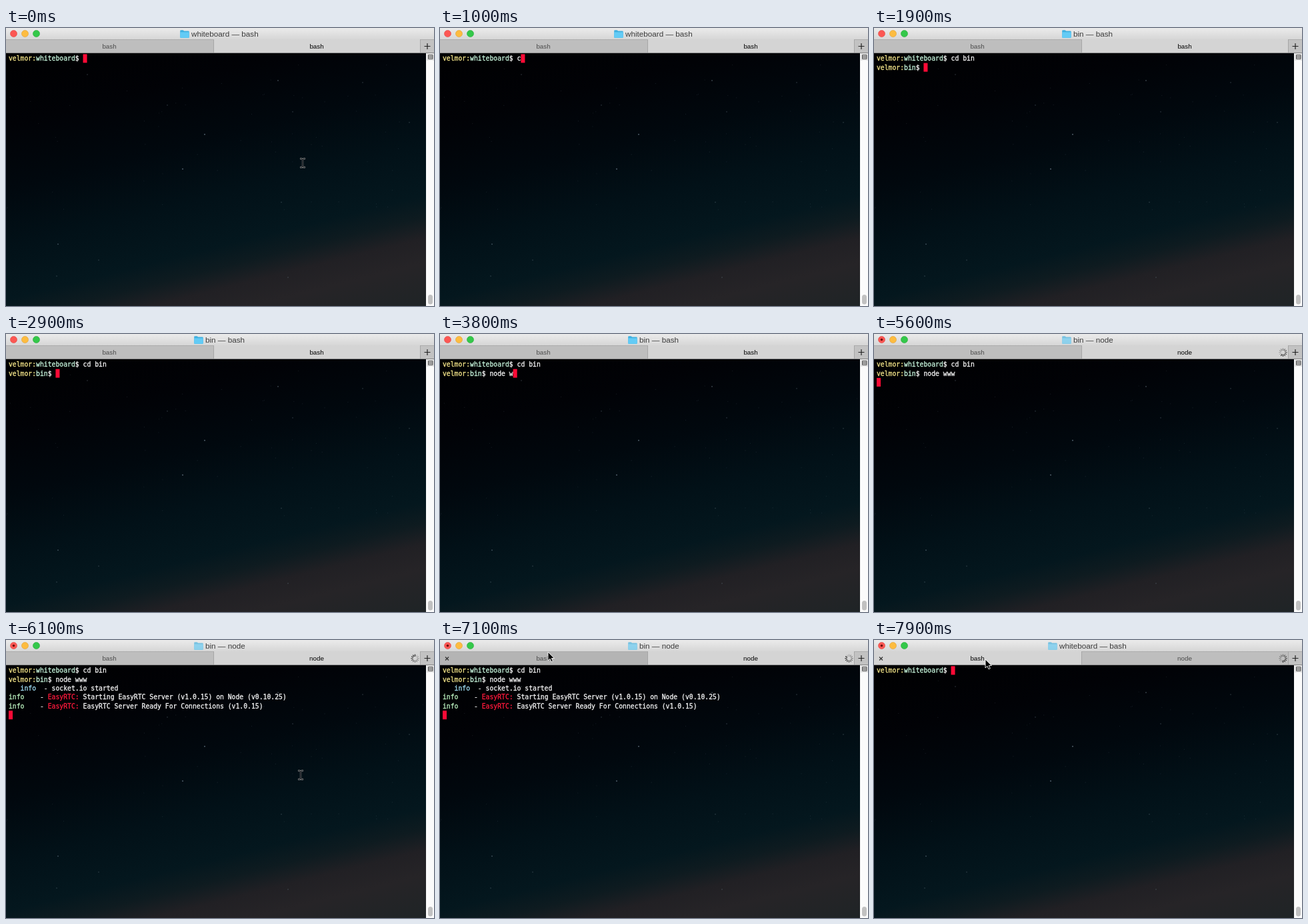
An HTML page that plays this animation: 642 by 418 pixels, repeating every 8 s.

```html
<!DOCTYPE html>
<html lang="en">
<head>
<meta charset="utf-8">
<title>Terminal</title>
<style>
  html, body { margin: 0; width: 100%; height: 100%; overflow: hidden; background: #000; }
  svg { display: block; width: 642px; height: 418px; }
  .ui { font-family: "Liberation Sans", Arial, sans-serif; }
  .tab { font-size: 9.8px; text-anchor: middle; }
  #screen text {
    font: 9.75px "DejaVu Sans Mono", monospace;
    white-space: pre; stroke-width: .3px;
  }
</style>
</head>
<body>
<svg viewBox="0 0 642 418" xmlns="http://www.w3.org/2000/svg">
  <defs>
    <linearGradient id="sky" gradientUnits="userSpaceOnUse" x1="0" y1="38" x2="126" y2="543">
      <stop offset="0" stop-color="#000001"/>
      <stop offset=".2" stop-color="#010206"/>
      <stop offset=".38" stop-color="#01080e"/>
      <stop offset=".55" stop-color="#021118"/>
      <stop offset=".69" stop-color="#04171e"/>
      <stop offset=".75" stop-color="#0e1b20"/>
      <stop offset=".81" stop-color="#212024"/>
      <stop offset=".88" stop-color="#262427"/>
      <stop offset="1" stop-color="#1f2426"/>
    </linearGradient>
    <linearGradient id="bar" x2="0" y2="1">
      <stop stop-color="#ebebeb"/><stop offset="1" stop-color="#d5d5d5"/>
    </linearGradient>
  </defs>

  <rect y="38" width="630" height="380" fill="url(#sky)"/>
  <g id="stars" fill="#8fa3b3"></g>
  <g id="screen"></g>
  <rect id="caret" width="6" height="13" fill="#ff0a36"/>

  <rect x="630" y="38" width="12" height="380" fill="#fbfbfb"/>
  <rect x="633" y="401" width="7" height="14.5" rx="3.5" fill="#c1c1c1"/>
  <rect x="631" y="38" width="11" height="11" fill="#e4e4e4"/>
  <path d="M633.5 40.5h6.5v6h-6.5zM634 42.5h6M634 44.5h6" fill="none" stroke="#555"/>

  <rect width="642" height="18" fill="url(#bar)"/>
  <rect y="17" width="642" height="20" fill="#d4d4d4"/>
  <rect id="idle" y="17" height="20" fill="#bebebe"/>
  <rect x="622" y="17" width="20" height="20" fill="#c2c2c2"/>
  <path d="M311.5 17v20M621.5 17v20" stroke="#a6a6a6"/>
  <path id="idleTop" stroke="#acacac"/>
  <path d="M622 17.5h20" stroke="#acacac"/>
  <path d="M0 37.5h642" stroke="#858585"/>
  <path d="M627.5 27.5h9M632 23v9" stroke="#222" stroke-width="1.2"/>

  <circle cx="11.5" cy="8.5" r="5" fill="#fc5753" stroke="#df4744" stroke-width=".6"/>
  <circle cx="28.5" cy="8.5" r="5" fill="#fdbc40" stroke="#de9f34" stroke-width=".6"/>
  <circle cx="45.5" cy="8.5" r="5" fill="#34c84a" stroke="#27aa35" stroke-width=".6"/>
  <circle id="busyDot" cx="11.5" cy="8.5" r="1.8" fill="#6b0f0d"/>

  <g id="folder">
    <path d="M.5 2.2q0-1 1-1h3.6l1.2 1.3h6.7q1 0 1 1v8.300q0 .9-1 .9H1.500q-1 0-1-.9z" fill="#3fb0e0"/>
    <path d="M.5 4.300h13.500v7.500q0 .9-1 .9H1.500q-1 0-1-.9z" fill="#63cbf5"/>
  </g>
  <text id="title" class="ui" y="12.600" font-size="11.7" fill="#3c3c3c"></text>
  <text id="tabL" class="ui tab" x="155" y="31">bash</text>
  <text id="tabR" class="ui tab" x="466" y="31"></text>
  <path id="close" d="M8 25.500l5 5m0-5l-5 5" stroke="#333" stroke-width="1.2"/>
  <g id="spinner" transform="translate(613.5 27.700)" stroke="#222" stroke-width="1.2"></g>

  <g id="beam" fill="none" stroke-linecap="round">
    <path id="beamPath" d="M-3-6.500q3 0 3 2v9q0 2-3 2M3-6.500q-3 0-3 2v9q0 2 3 2" stroke="#858585" stroke-width="2.400"/>
    <path d="M-3-6.500q3 0 3 2v9q0 2-3 2M3-6.500q-3 0-3 2v9q0 2 3 2" stroke="#10151a"/>
  </g>
  <path id="arrow" d="M0 0v13l3-2.700 2 4.500 2.300-1-2-4.300h4z" fill="#000" stroke="#fff" stroke-width=".9"/>
</svg>

<script>
const LOOP = 8000, COL = 5.87, ROW = 13.4;
const ENTER_CD = 1700, ENTER_NODE = 4900, OUTPUT = 5700, SWITCH = 7600;
const WHITE = '#f4f4f4', YELLOW = '#f5e68a', MINT = '#c6f5dc', RED = '#ff1a3c';

const typed = [
  { text: 'cd bin', at: [1000, 1100, 1200, 1300, 1400, 1500] },
  { text: 'node www', at: [3000, 3100, 3200, 3300, 3500, 3800, 4000, 4200] }
];

// time, x, y: the pointer hides while typing
const path = [
  [5800, 445, 203], [6100, 442, 203], [6500, 442, 203],
  [7100, 162, 18], [7500, 167, 29], [8000, 167, 29]
];

const el = id => document.getElementById(id);
const show = (id, on) => el(id).setAttribute('visibility', on ? 'visible' : 'hidden');
const move = (id, x, y) => el(id).setAttribute('transform', `translate(${x} ${y})`);

const prompt = dir => [['velmor:', YELLOW], [dir, MINT], ['$ ', WHITE]];
const typedAt = (cmd, t) => cmd.text.slice(0, cmd.at.filter(a => a <= t).length);
const log = (tag, text) =>
  [['info', tag], ['    - ', WHITE], ['EasyRTC: ', RED], [text, WHITE]];

function linesAt(t) {
  if (t >= SWITCH) return [prompt('whiteboard')];
  const lines = [[...prompt('whiteboard'), [typedAt(typed[0], t), WHITE]]];
  if (t >= ENTER_CD) lines.push([...prompt('bin'), [typedAt(typed[1], t), WHITE]]);
  if (t >= OUTPUT) lines.push(
    [['   info', '#9fdcf2'], ['  - socket.io started', WHITE]],
    log('#b9efbd', 'Starting EasyRTC Server (v1.0.15) on Node (v0.10.25)'),
    log('#b9efbd', 'EasyRTC Server Ready For Connections (v1.0.15)'));
  if (t >= ENTER_NODE) lines.push([]);
  return lines;
}

let drawn = '';
function drawScreen(t) {
  const lines = linesAt(t);
  const html = lines.map((line, i) =>
    `<text x="4" y="${(49.2 + i * ROW).toFixed(1)}">` +
    line.map(([s, c]) => `<tspan fill="${c}" stroke="${c}">${s}</tspan>`).join('') +
    '</text>').join('');
  if (html === drawn) return;
  drawn = html;
  el('screen').innerHTML = html;
  const last = lines.length - 1;
  const cols = lines[last].reduce((n, [s]) => n + s.length, 0);
  el('caret').setAttribute('x', 4 + cols * COL);
  el('caret').setAttribute('y', 39.3 + last * ROW);
}

function drawWindow(t) {
  const running = t >= ENTER_NODE, left = t >= SWITCH;
  const dir = t < ENTER_CD || left ? 'whiteboard' : 'bin';
  const job = running ? 'node' : 'bash';
  const x = dir === 'bin' ? 299 : 278;
  el('title').setAttribute('x', x);
  el('title').textContent = `${dir} — ${left ? 'bash' : job}`;
  move('folder', x - 17.3, 2);
  el('folder').setAttribute('opacity', running ? 0.65 : 1);
  el('tabR').textContent = job;
  el('tabL').setAttribute('fill', left ? '#000' : '#4a4a4a');
  el('tabR').setAttribute('fill', left ? '#4a4a4a' : '#000');
  el('idle').setAttribute('x', left ? 312 : 0);
  el('idle').setAttribute('width', left ? 309 : 311);
  el('idleTop').setAttribute('d', left ? 'M312 17.5h309' : 'M0 17.5h311');
  show('busyDot', running);
  show('spinner', running);
  const step = Math.floor(t / 100);
  [...el('spinner').children].forEach((spoke, i) =>
    spoke.setAttribute('opacity', 0.2 + 0.8 * ((i - step + 1200) % 12) / 11));
}

function pointerAt(t) {
  if (t < 1000) return [445, 203];
  const i = path.findIndex(p => p[0] > t);
  if (i < 1) return null;
  const [t0, x0, y0] = path[i - 1], [t1, x1, y1] = path[i];
  const u = (t - t0) / (t1 - t0), e = u * u * (3 - 2 * u);
  return [x0 + (x1 - x0) * e, y0 + (y1 - y0) * e];
}

function drawPointer(t) {
  const p = pointerAt(t), onBar = p && p[1] < 38;
  show('beam', p && !onBar);
  show('arrow', onBar);
  const hover = onBar && p[1] > 17 && p[0] < 312;
  show('close', hover);
  el('idle').setAttribute('fill', hover && t < SWITCH ? '#b4b4b4' : '#bebebe');
  if (p) move(onBar ? 'arrow' : 'beam', ...p);
}

function build() {
  const star = (x, y, r, a) => `<circle cx="${x}" cy="${y}" r="${r}" opacity="${a}"/>`;
  const bright = [[298, 160], [265, 212], [408, 79], [78, 325], [242, 116], [535, 82],
    [605, 142], [122, 70], [139, 349], [430, 126], [76, 373], [423, 375], [413, 262]];
  let html = bright.map(([x, y], i) => star(x, y, i < 4 ? 1.1 : 0.8, i < 2 ? 0.5 : 0.35)).join('');
  let seed = 7;
  const rnd = () => (seed = seed * 16807 % 2147483647) / 2147483647;
  for (let i = 0; i < 60; i++)
    html += star((rnd() * 628).toFixed(1), (42 + rnd() * 250).toFixed(1), 0.6, 0.16);
  el('stars').innerHTML = html;
  el('spinner').innerHTML = Array.from({ length: 12 }, (_, i) =>
    `<path d="M0-3v-3.2" transform="rotate(${i * 30})"/>`).join('');
}

function frame() {
  const t = performance.now() % LOOP;
  drawScreen(t);
  drawWindow(t);
  drawPointer(t);
  requestAnimationFrame(frame);
}

build();
frame();
</script>
</body>
</html>
```
